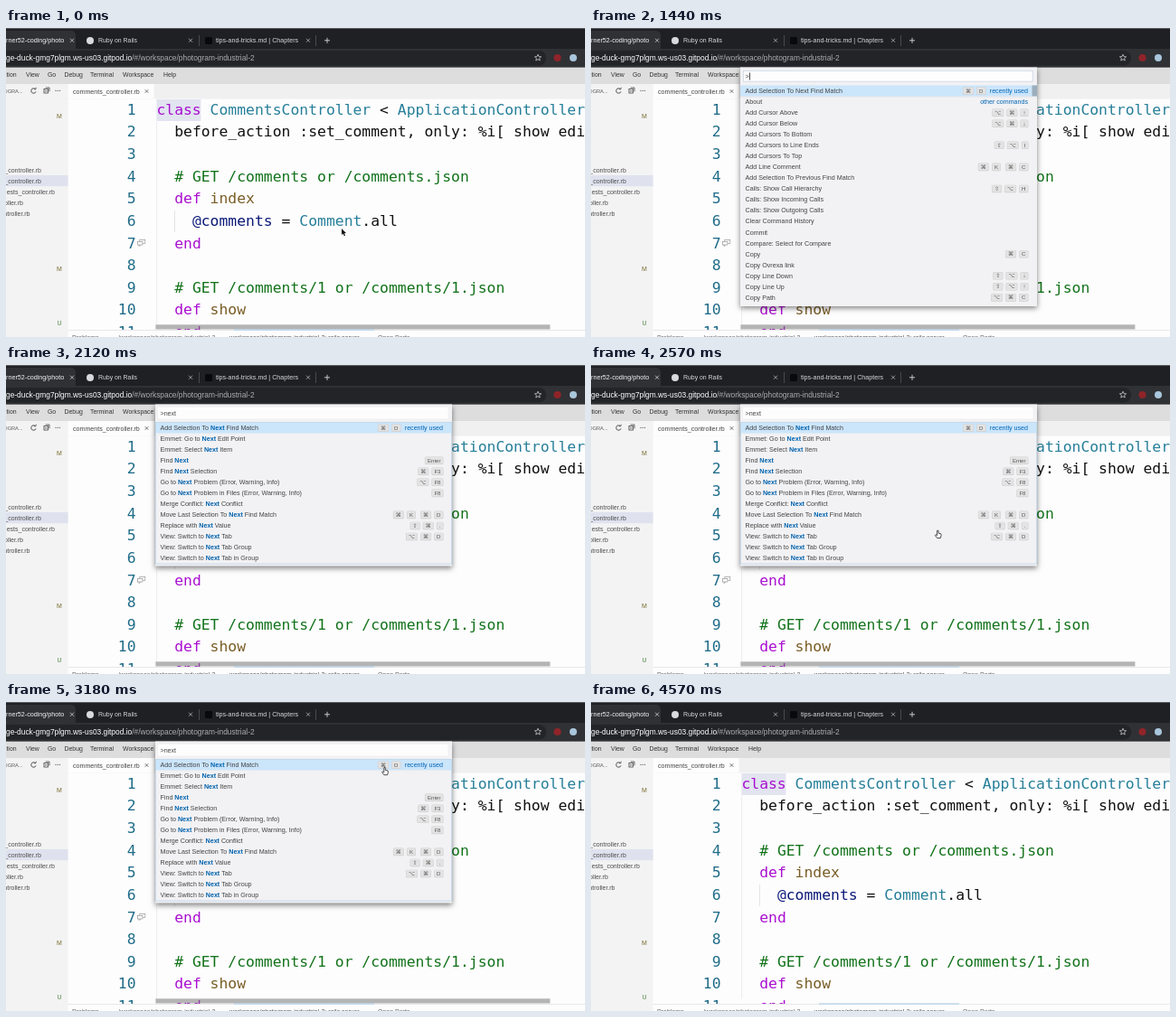
These frames come from a looping animation (640 by 342 pixels, 4630 ms). An HTML page with a canvas:

```html
<!DOCTYPE html>
<html lang="en">
<head>
<meta charset="utf-8">
<title>Command palette</title>
<style>
html, body { margin: 0; width: 100%; height: 100%; overflow: hidden; background: #fff; }
canvas { display: block; width: 640px; height: 342px; }
</style>
</head>
<body>
<canvas id="stage"></canvas>
<script>
const W = 640, H = 342, LOOP = 4630;
const canvas = document.getElementById('stage');
const scale = window.devicePixelRatio || 1;
canvas.width = W * scale;
canvas.height = H * scale;
const g = canvas.getContext('2d');

const SANS = '"Liberation Sans", Arial, sans-serif';
const KEYS = '"Liberation Sans", "DejaVu Sans", sans-serif';
const MONO = '"DejaVu Sans Mono", monospace';
const PURPLE = '#a90fd0', TEAL = '#267f99', GREEN = '#12731a', NAVY = '#0b1a78', BROWN = '#795e26', INK = '#111';

// Times in ms
const OPEN = 210, HIDE = 1400, TYPE = 1500, KEY_GAP = 110;
const MOVE = 2430, ARRIVE = 2850, CLOSE = 3260, LEAVE = 3360;

const code = [
  [0, ['class', PURPLE], [' CommentsController', TEAL], [' < ', INK], ['ApplicationController', TEAL]],
  [2, ['before_action :set_comment, only: %i[ show edit update ]', INK]],
  [0],
  [2, ['# GET /comments or /comments.json', GREEN]],
  [2, ['def', PURPLE], [' index', BROWN]],
  [4, ['@comments', NAVY], [' = ', INK], ['Comment', TEAL], ['.all', INK]],
  [2, ['end', PURPLE]],
  [0],
  [2, ['# GET /comments/1 or /comments/1.json', GREEN]],
  [2, ['def', PURPLE], [' show', BROWN]],
  [2, ['end', PURPLE]]
];

// Each row: label, then key chords
const allRows = [
  ['Add Selection To Next Find Match', '⌘ D'],
  ['About'],
  ['Add Cursor Above', '⌥ ⌘ ↑'],
  ['Add Cursor Below', '⌥ ⌘ ↓'],
  ['Add Cursors To Bottom'],
  ['Add Cursors to Line Ends', '⇧ ⌥ I'],
  ['Add Cursors To Top'],
  ['Add Line Comment', '⌘ K', '⌘ C'],
  ['Add Selection To Previous Find Match'],
  ['Calls: Show Call Hierarchy', '⇧ ⌥ H'],
  ['Calls: Show Incoming Calls'],
  ['Calls: Show Outgoing Calls'],
  ['Clear Command History'],
  ['Commit'],
  ['Compare: Select for Compare'],
  ['Copy', '⌘ C'],
  ['Copy Ovrexa link'],
  ['Copy Line Down', '⇧ ⌥ ↓'],
  ['Copy Line Up', '⇧ ⌥ ↑'],
  ['Copy Path', '⌥ ⌘ C']
];
const nextRows = [
  ['Add Selection To Next Find Match', '⌘ D'],
  ['Emmet: Go to Next Edit Point'],
  ['Emmet: Select Next Item'],
  ['Find Next', 'Enter'],
  ['Find Next Selection', '⌘ F3'],
  ['Go to Next Problem (Error, Warning, Info)', '⌥ F8'],
  ['Go to Next Problem in Files (Error, Warning, Info)', 'F8'],
  ['Merge Conflict: Next Conflict'],
  ['Move Last Selection To Next Find Match', '⌘ K', '⌘ D'],
  ['Replace with Next Value', '⇧ ⌘ .'],
  ['View: Switch to Next Tab', '⌥ ⌘ D'],
  ['View: Switch to Next Tab Group'],
  ['View: Switch to Next Tab in Group']
];

function rect(x, y, w, h, color) {
  g.fillStyle = color;
  g.fillRect(x, y, w, h);
}

function round(x, y, w, h, r, color) {
  g.fillStyle = color;
  g.beginPath();
  g.roundRect(x, y, w, h, r);
  g.fill();
}

function disc(x, y, r, color) {
  g.fillStyle = color;
  g.beginPath();
  g.arc(x, y, r, 0, 7);
  g.fill();
}

function path(points, color, width = 0.9, fill) {
  g.beginPath();
  points.forEach(([x, y], i) => i ? g.lineTo(x, y) : g.moveTo(x, y));
  if (fill) {
    g.closePath();
    g.fillStyle = fill;
    g.fill();
  }
  g.strokeStyle = color;
  g.lineWidth = width;
  g.stroke();
}

// Returns the x where the text ends
function text(s, x, y, color, size = 7.1, align = 'left', weight = 'normal', family = SANS) {
  g.font = `${weight} ${size}px ${family}`;
  g.textAlign = align;
  g.fillStyle = color;
  g.fillText(s, x, y);
  return x + g.measureText(s).width;
}

function cross(x, y, color, r = 2) {
  path([[x - r, y - r], [x + r, y + r]], color, 0.8);
  path([[x - r, y + r], [x + r, y - r]], color, 0.8);
}

function star(x, y) {
  const pts = [];
  for (let i = 0; i <= 10; i++) {
    const r = i % 2 ? 1.7 : 3.8, a = i * Math.PI / 5 - Math.PI / 2;
    pts.push([x + r * Math.cos(a), y + r * Math.sin(a)]);
  }
  path(pts, '#c8c9cc', 0.8);
}

function drawBrowser() {
  rect(0, 0, W, 23, '#1f2024');
  rect(0, 0, W, 0.8, '#6c6c6f');
  round(-8, 3, 85, 24, 5, '#303135');
  rect(0, 23, W, 20.5, '#303135');
  round(-20, 25, 617, 16.5, 8, '#232428');

  text('rner52-coding/photo', 0, 16.3, '#f1f3f4', 7.2);
  cross(73, 13.7, '#d5d6d9');
  disc(93, 14, 4, '#d8dadd');
  text('Ruby on Rails', 102, 16.3, '#d5d7da', 6.9);
  cross(204, 13.7, '#b6b8bc');
  rect(213, 8, 0.7, 12, '#5b5d61');
  round(220, 10, 8, 8, 1.5, '#08090b');
  text('tips-and-tricks.md | Chapters', 232, 16.3, '#d5d7da', 7.15);
  cross(334, 13.7, '#b6b8bc');
  rect(342, 8, 0.7, 12, '#5b5d61');
  path([[352, 13.8], [358, 13.8]], '#d5d6d9');
  path([[355, 10.8], [355, 16.8]], '#d5d6d9');

  const host = text('ge-duck-gmg7plgm.ws-us03.gitpod.io', 0, 36, '#fff', 8.4);
  text('/#/workspace/photogram-industrial-2', host, 36, '#a9adb2', 8.4);
  star(588, 33);
  disc(609.5, 33, 4, '#8f2429');
  disc(627, 33, 4, '#a9c6dc');
}

function drawMenu() {
  rect(0, 43.5, W, 18.5, '#dddddd');
  const items = [['ction', -3], ['View', 22], ['Go', 46], ['Debug', 64.5], ['Terminal', 93], ['Workspace', 129], ['Help', 174]];
  for (const [label, x] of items) text(label, x, 54.1, '#333', 6.9);
}

function drawSidebar() {
  rect(0, 62, 68.5, H - 62, '#f3f3f3');
  text('OGRA...', 18.5, 71.5, '#555', 5.6, 'right');
  g.strokeStyle = '#424242';
  g.lineWidth = 0.9;
  g.beginPath();
  g.arc(30.5, 69.5, 2.7, 0.3, 5.5);
  g.stroke();
  path([[31, 67.8], [33, 67.6], [33.2, 65.7]], '#424242', 0.8);
  g.strokeRect(42, 67.5, 4.5, 4.5);
  path([[43.7, 66], [48, 66], [48, 70.3]], '#424242', 0.8);
  path([[43, 69.8], [45.6, 69.8]], '#424242', 0.8);
  for (const x of [55, 57.2, 59.4]) disc(x, 69.3, 0.6, '#424242');

  rect(0, 163, 68.5, 12.2, '#dfe2ee');
  const files = [['_controller.rb', 38.8], ['_controller.rb', 38.8], ['ests_controller.rb', 54], ['oller.rb', 19], ['ontroller.rb', 26.5]];
  files.forEach(([name, end], i) => text(name, end, 159.8 + i * 12.05, '#4d4d4d', 7, 'right'));
  text('M', 59, 99.8, '#756b2c', 7, 'center');
  text('M', 59, 268.8, '#756b2c', 7, 'center');
  text('U', 59, 328.8, '#4f8340', 7, 'center');
}

function drawEditor(hover) {
  rect(68.5, 62, W - 68.5, H - 62, '#fefdfe');
  rect(68.5, 62, W - 68.5, 16.5, '#f0f0f0');
  rect(68.5, 62, 95, 16.5, '#fefdfe');
  text('comments_controller.rb', 74, 72.5, '#444');
  cross(155.5, 70, '#555', 1.8);

  const left = 166.4, pitch = 24.63, cell = 9.87, size = 16.4;
  rect(left, 79, 49, 24, '#e2e4f0');
  rect(left, 103.5, 0.7, 225, '#e4e4e4');
  rect(186, 202, 0.7, 24, '#d8d8d8');
  code.forEach(([indent, ...parts], i) => {
    const y = 95.8 + i * pitch;
    text(String(i + 1), 143.5, y, '#1f6c88', size, 'right', 'normal', MONO);
    let x = left + indent * cell;
    for (const [s, color] of parts) x = text(s, x, y, color, size, 'left', 'normal', MONO);
  });

  if (hover) {
    g.strokeStyle = '#9a9a9a';
    g.lineWidth = 0.7;
    g.strokeRect(147.8, 234.4, 6, 4);
    round(145.2, 236.4, 6, 4, 0.5, '#fefdfe');
    g.strokeRect(145.4, 236.4, 5.5, 3.6);
    path([[147, 240], [147, 241.7], [149, 240]], '#9a9a9a', 0.7);
    rect(left - 1, 328.3, 436, 5.2, 'rgba(120,120,120,0.55)');
  }

  rect(68.5, 334, W - 68.5, 8, '#fefdfe');
  rect(68.5, 334, W - 68.5, 0.7, '#dedede');
  rect(252, 333.5, 155, 1, '#a3cbe9');
  text('Problems', 73, 345, '#666', 7);
  text('/workspace/photogram-industrial-2', 124, 345, '#666', 7);
  text('workspace/photogram-industrial-2: rails server', 247, 345, '#555', 7);
  text('Open Ports', 411, 345, '#666', 7);
}

function drawKeys(chords, right, mid) {
  let x = right;
  for (const chord of [...chords].reverse()) {
    for (const key of chord.split(' ').reverse()) {
      g.font = `6.1px ${KEYS}`;
      const w = g.measureText(key).width + 6;
      round(x - w, mid - 4.3, w, 8.6, 1.5, '#cfcfcf');
      round(x - w + 0.5, mid - 3.9, w - 1, 7.5, 1.2, '#e3e3e3');
      text(key, x - w / 2, mid + 2.1, '#555', 6.1, 'center', 'normal', KEYS);
      x -= w + 3;
    }
    x -= 2;
  }
}

function drawLabel(label, y, query) {
  const ink = '#444', size = 7.15;
  const at = query ? label.toLowerCase().indexOf(query) : -1;
  if (at < 0) return text(label, 170.5, y, ink, size);
  const end = at + query.length;
  let x = text(label.slice(0, at), 170.5, y, ink, size);
  x = text(label.slice(at, end), x, y, '#0062ad', size, 'left', 'bold');
  text(label.slice(end), x, y, ink, size);
}

function drawPalette(t) {
  const typed = Math.max(0, Math.min(4, Math.floor((t - TYPE) / KEY_GAP) + 1));
  const query = 'next'.slice(0, typed);
  const filtered = typed > 1;
  const rows = filtered ? nextRows : allRows;
  const pitch = 12.04, top = 43.5;
  const height = filtered ? 179 : 264.5;

  g.save();
  g.shadowColor = 'rgba(0,0,0,0.5)';
  g.shadowBlur = 6 * scale;
  g.shadowOffsetY = 2 * scale;
  rect(165, top, 328, height, '#f2f1f3');
  g.restore();

  rect(168, 47, 320.5, 12.5, typed ? '#fefdfe' : '#c3d3e0');
  rect(168.7, 47.7, 319.1, 11.1, '#fefdfe');
  const caret = text('>' + query, 170.5, 56, '#444');
  if (!typed && Math.floor((t - OPEN) / 500) % 2 === 0) rect(caret + 0.4, 49.5, 0.8, 8, '#222');

  rect(165, 63.5, 328, 12, '#cbe5fb');
  if (filtered) {
    g.strokeStyle = '#bcd6ea';
    g.lineWidth = 0.8;
    g.strokeRect(165.4, 63.5, 327.2, 156.6);
  } else {
    rect(165, 75.8, 323, 0.5, '#d5d8e0');
    rect(487.5, 63.5, 5.5, 12, '#9baebd');
  }
  rows.forEach(([label, ...chords], i) => {
    const mid = 69.6 + i * pitch;
    drawLabel(label, mid + 2.4, filtered ? query : '');
    drawKeys(chords, i ? 483.5 : 436.5, mid);
  });
  text('recently used', 483, 72, '#0066b5', 7.1, 'right');
  if (!filtered) text('other commands', 483, 84.1, '#0066b5', 7.1, 'right');
}

function drawArrow(x, y) {
  const pts = [[0, 0], [0, 7], [1.6, 5.6], [2.8, 8.2], [4, 7.7], [2.9, 5.2], [5, 5]].map(([a, b]) => [x + a, y + b]);
  path([...pts, pts[0]], '#fff', 1.4, '#111');
  path(pts, 'transparent', 0.1, '#111');
}

function drawHand(x, y) {
  const pts = [[-0.7, 0], [0.6, 0], [0.8, 3], [3.4, 3.6], [3.8, 5], [3, 8.3], [-0.8, 8.3], [-3, 5.3], [-2.4, 4.5], [-0.8, 5.4]];
  path([...pts, pts[0]].map(([a, b]) => [x + a, y + b]), '#222', 0.8, '#fff');
}

function drawPointer(t) {
  if (t < HIDE) return drawArrow(371, 222);
  if (t < MOVE || t >= LEAVE) return;
  const p = Math.min(1, (t - MOVE) / (ARRIVE - MOVE));
  const e = p * p * (3 - 2 * p);
  const x = 371 + 47.6 * e, y = 222 - 149.6 * e;
  if (y < 222 && t < CLOSE) drawHand(x, y);
  else drawArrow(x, y);
}

function draw(t) {
  g.setTransform(scale, 0, 0, scale, 0, 0);
  drawEditor(t < LEAVE);
  drawSidebar();
  drawMenu();
  drawBrowser();
  if (t >= OPEN && t < CLOSE) drawPalette(t);
  drawPointer(t);
}

let start;
function frame(now) {
  start ??= now;
  draw((now - start) % LOOP);
  requestAnimationFrame(frame);
}
draw(0);
requestAnimationFrame(frame);
</script>
</body>
</html>
```
